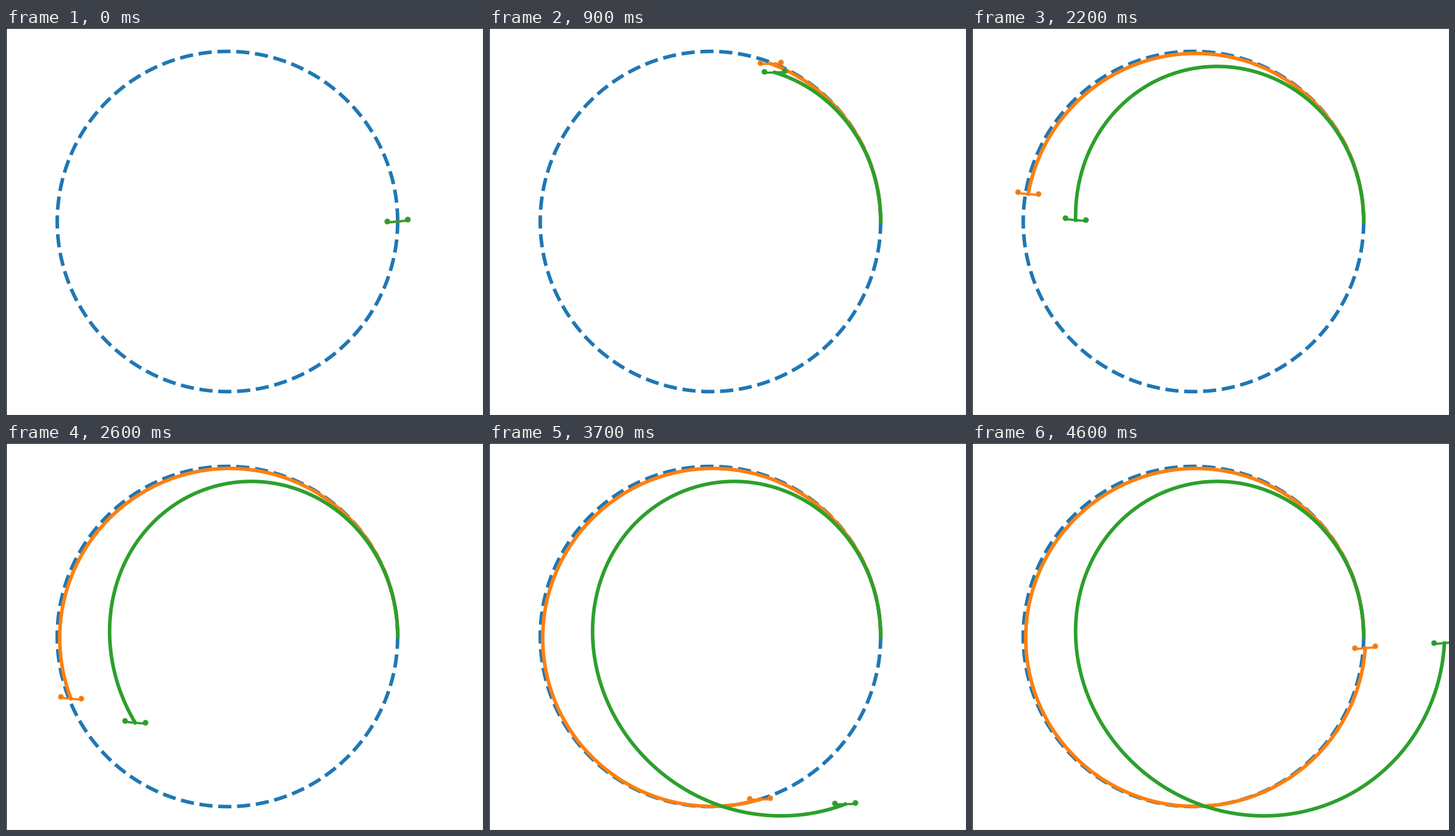
Animation of 744x604 px, one loop 4.7 s. Source, as a matplotlib script:

```python
import numpy as np
import matplotlib.pyplot as plt
from matplotlib.animation import FuncAnimation
from matplotlib.patches import Circle

W, H, DPI = 744, 604, 100
FRAMES, INTERVAL = 47, 100
CX, RADIUS = 345.4, 265.5
ARM, LIFT, ROTOR = 16, 1.5, 2.66
RATE = np.radians(7.755)    # orbit angle per frame
WOBBLE = np.radians(10)     # tracking error angle per frame
MAX_TILT = np.radians(5.4)


def orbit(t):
    return RADIUS * np.cos(RATE * t), RADIUS * np.sin(RATE * t)


def tracked(t):
    """Orbit with a small, bounded tracking error."""
    x, y = orbit(t)
    a = WOBBLE * t
    return x + 2.4 * (1 - np.cos(a)), y - 1 - 2.2 * np.sin(a - 0.47)


def drifting(t):
    """Orbit whose error builds up without correction."""
    x, y = orbit(t)
    a = RATE * t
    drift, swing = a - np.sin(a), 1 - np.cos(a)
    return (x + 20.1 * drift + 3.65 * a * swing,
            y + 0.78 * drift + (2.15 * a - 28.2) * swing)


class Drone:
    """Planar quadrotor that leaves its path behind it."""

    def __init__(self, ax, color, path, z):
        self.path = path
        self.trail, = ax.plot([], [], color=color, lw=4, zorder=z)
        self.body, = ax.plot([], [], color=color, lw=2.5, zorder=z + 0.1)
        self.rotors = [ax.add_patch(Circle((0, 0), ROTOR, fc="C0", ec=color,
                                           lw=2.5, zorder=z + 0.2))
                       for _ in range(2)]

    def update(self, t):
        x, y = self.path(np.linspace(0, t, 10 * t + 1))
        self.trail.set_data(x, y)
        tilt = MAX_TILT * np.cos(RATE * t)
        c, s = np.cos(tilt), np.sin(tilt)
        pos = np.array([x[-1], y[-1]])
        arm, up = ARM * np.array([c, s]), LIFT * np.array([-s, c])
        ends = pos - arm, pos + arm
        self.body.set_data(*zip(*ends))
        for rotor, end in zip(self.rotors, ends):
            rotor.center = tuple(end + up)
        return [self.trail, self.body, *self.rotors]


fig = plt.figure(figsize=(W / DPI, H / DPI), dpi=DPI)
ax = fig.add_axes([0, 0, 1, 1])
ax.set_xlim(-CX, W - CX)
ax.set_ylim(-H / 2, H / 2)

ax.plot(*orbit(np.linspace(0, 2 * np.pi / RATE, 400)), "--", color="C0", lw=4)
drones = [Drone(ax, "C1", tracked, 3), Drone(ax, "C2", drifting, 4)]


def update(i):
    return [artist for d in drones for artist in d.update(i)]


anim = FuncAnimation(fig, update, frames=FRAMES, interval=INTERVAL,
                     repeat=True, repeat_delay=0)
plt.show()
```
